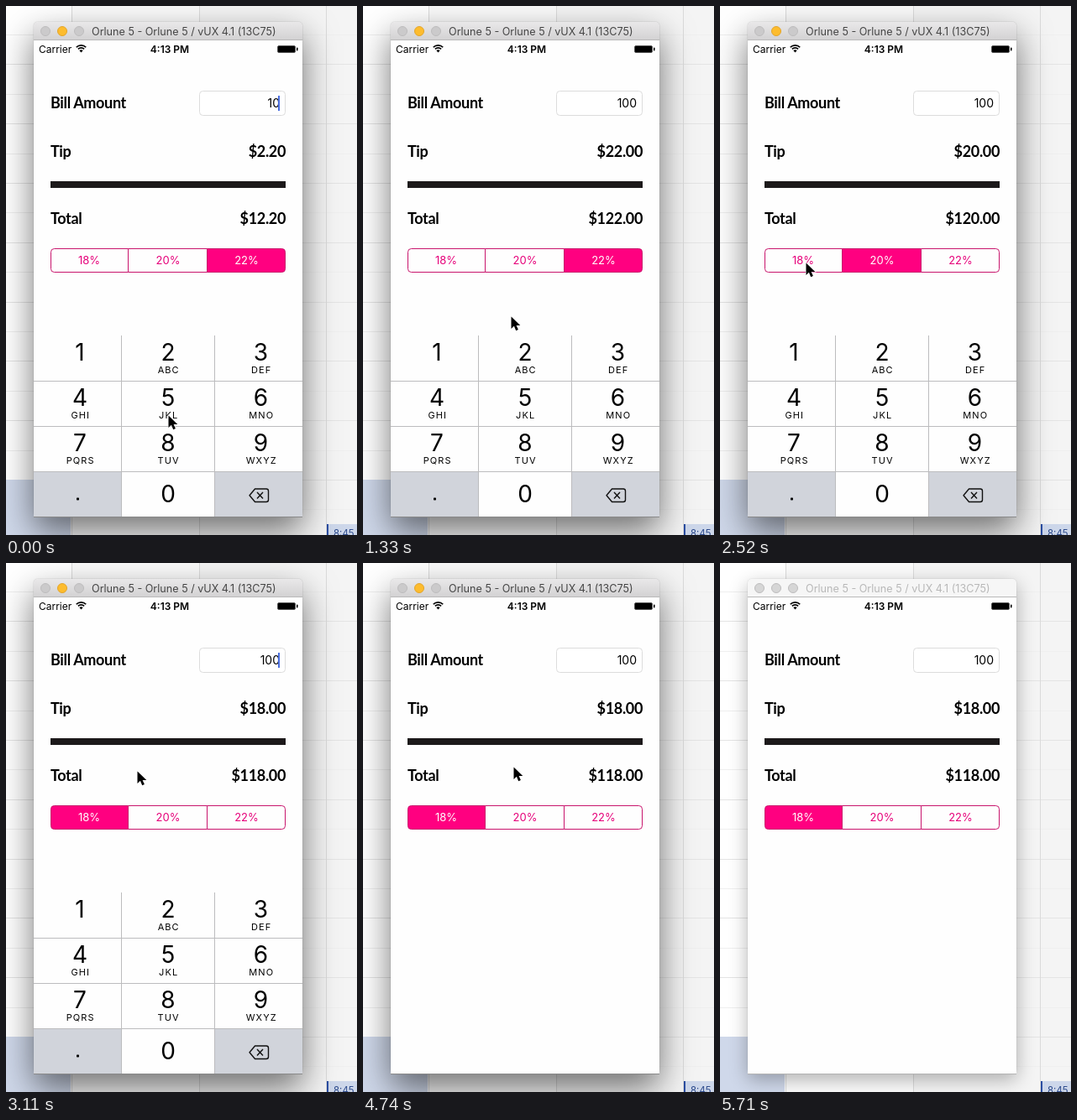
Write an HTML page that moves like this. It is 418x631 px and loops after 5810 ms.

```html
<!DOCTYPE html>
<html lang="en">
<head>
<meta charset="utf-8">
<title>Tip calculator</title>
<style>
  html, body { margin: 0; width: 100%; height: 100%; overflow: hidden; background: #fff; }
  #stage { position: absolute; left: 0; top: 0; width: 418px; height: 631px; overflow: hidden; }
  svg { position: absolute; left: 0; top: 0; font-family: Inter, sans-serif; }
  #shadow {
    position: absolute; left: 33px; top: 19px; width: 320px; height: 590px; border-radius: 5px;
    box-shadow: 0 17px 40px rgba(0, 0, 0, .55), 0 0 1px rgba(0, 0, 0, .5);
  }
  #shadow.idle { box-shadow: 0 7px 22px rgba(0, 0, 0, .3), 0 0 1px rgba(0, 0, 0, .4); }
  .label { font: 700 18px Lato, sans-serif; letter-spacing: -.35px; }
  .end { text-anchor: end; }
  .mid { text-anchor: middle; }
</style>
</head>
<body>
<div id="stage">
  <svg id="back" width="418" height="631"></svg>
  <div id="shadow"></div>
  <svg id="front" width="418" height="631">
    <defs>
      <linearGradient id="bar" x2="0" y2="1">
        <stop stop-color="#e9e8e9"/><stop offset="1" stop-color="#d2d1d2"/>
      </linearGradient>
      <clipPath id="screen"><path d="M33 41h320v568H33z"/></clipPath>
    </defs>
  </svg>
</div>
<script>
const LOOP = 5810;
const PINK = '#ff0080';
const $ = id => document.getElementById(id);

function add(parent, tag, attrs, text) {
  const node = document.createElementNS('http://www.w3.org/2000/svg', tag);
  for (const k in attrs) node.setAttribute(k, attrs[k]);
  if (text !== undefined) node.textContent = text;
  parent.appendChild(node);
  return node;
}
const rect = (p, x, y, width, height, fill, more) =>
  add(p, 'rect', { x, y, width, height, fill, ...more });
const label = (p, x, y, text, size, more) =>
  add(p, 'text', { x, y, 'font-size': size, ...more }, text);

// Calendar behind the window
const back = $('back');
rect(back, 0, 0, 418, 631, '#fff');
rect(back, 79, 0, 151, 631, '#fafafa');
rect(back, 230, 0, 188, 631, '#f4f4f4');
for (let i = 0; i < 18; i++) {
  rect(back, 0, Math.round(34 + i * 35.4), 418, 1, i % 2 ? '#e4e4e4' : '#efefef');
}
for (const x of [78, 230, 381]) rect(back, x, 0, 1, 631, '#dadada');
rect(back, 0, 565, 77, 66, '#cfd8ea');
rect(back, 382, 618, 36, 13, '#cdd7ea');
rect(back, 382, 618, 2, 13, '#2b4ea2');
label(back, 390, 633, '8:45', 11.5, { fill: '#2c4a8c' });

// Window frame
const front = $('front');
const bar = add(front, 'path', { d: 'M33 41V24q0-5 5-5h310q5 0 5 5v17z' });
rect(front, 33, 40, 320, 1, '#b9b9b9');
const lights = [47, 67, 87].map(cx =>
  add(front, 'circle', { cx, cy: 30, r: 5.5, 'stroke-width': 1 }));
const title = label(front, 102, 35, 'Orlune 5 - Orlune 5 / vUX 4.1 (13C75)', 12.6);
rect(front, 33, 41, 320, 568, '#fefefe');

// Status bar
label(front, 39, 55.5, 'Carrier', 12);
label(front, 195, 55.5, '4:13 PM', 12, { class: 'mid', 'font-weight': 600 });
for (const r of [8, 5]) {
  const d = r * .72;
  add(front, 'path', {
    d: `M${89.5 - d} ${55 - d}A${r} ${r} 0 0 1 ${89.5 + d} ${55 - d}`,
    fill: 'none', stroke: '#000', 'stroke-width': 1.7
  });
}
add(front, 'path', { d: 'M89.5 55.5l-2.2-2.4q2.2-1.8 4.4 0z' });
rect(front, 323.5, 47.5, 21, 8, '#000', { rx: 1.5, stroke: '#555', 'stroke-width': 1 });
rect(front, 346, 49.5, 1.5, 4, '#000', { rx: .7 });

// Calculator
const row = (y, text) => label(front, 53, y, text, 18, { class: 'label' });
const sum = y => label(front, 333, y, '', 18, { class: 'label end' });
row(122, 'Bill Amount');
row(180, 'Tip');
row(260, 'Total');
const tip = sum(180), total = sum(260);
rect(front, 230.5, 101.5, 102, 29, '#fff', { rx: 4, stroke: '#dcdcdc' });
const bill = label(front, 326, 121, '', 14, { class: 'end' });
const caret = rect(front, 324, 107, 2, 18, '#4a6ee0');
rect(front, 53, 209, 280, 8, '#1c191a');

const segments = [
  [18, 99, 'M145.5 289.5H57.5a4 4 0 0 0-4 4v20a4 4 0 0 0 4 4H145.5z'],
  [20, 193, 'M145.5 289.5h94v28h-94z'],
  [22, 286.5, 'M239.5 289.5h89a4 4 0 0 1 4 4v20a4 4 0 0 1-4 4h-89z']
].map(([rate, x, d]) => ({
  rate,
  box: add(front, 'path', { d, stroke: '#c8146c' }),
  text: label(front, x, 308, rate + '%', 13, { class: 'mid' })
}));

// Keypad
const clip = add(front, 'g', { 'clip-path': 'url(#screen)' });
const pad = add(clip, 'g', {});
rect(pad, 33, 393, 320, 216, '#fefefe');
rect(pad, 33, 555, 104, 54, '#d1d4db');
rect(pad, 249, 555, 104, 54, '#d1d4db');
const zero = rect(pad, 138, 555, 110, 54, '#d1d4db');
const centers = [88, 193, 303.5];
const letters = ['', 'ABC', 'DEF', 'GHI', 'JKL', 'MNO', 'PQRS', 'TUV', 'WXYZ'];
letters.forEach((text, i) => {
  const x = centers[i % 3], y = 423 + 54 * Math.floor(i / 3);
  label(pad, x, y, i + 1, 28, { class: 'mid' });
  label(pad, x + .7, y + 15, text, 11, { class: 'mid', 'letter-spacing': 1.1 });
});
label(pad, 193, 592, '0', 28, { class: 'mid' });
rect(pad, 84, 586.5, 3, 3, '#000', { rx: .8 });
add(pad, 'path', {
  d: 'M296.5 576h13.5q2.500 0 2.500 2.500v10.500q0 2.500-2.500 2.500h-13.500l-6.500-7.750zM299 580l7 7.500m0-7.500l-7 7.500',
  fill: 'none', stroke: '#111', 'stroke-width': 1.4, 'stroke-linejoin': 'round'
});
for (const y of [447, 501, 555]) rect(pad, 33, y, 320, 1, '#bcbcbe');
for (const x of [137, 248]) rect(pad, x, 393, 1, 216, '#bcbcbe');

const frame = add(front, 'path', { d: 'M33 609.5h320', stroke: '#8a8a8a' });
const arrow = add(front, 'path', {
  d: 'M.5 .5v14.500l3.400-3.200 2.300 5.400 2.700-1.100-2.300-5.200h4.700z',
  stroke: '#fff', 'stroke-width': 1.2, 'paint-order': 'stroke'
});

// Each track holds [start, value...] steps
const pointer = [
  [0, 193, 488], [140, 193, 515], [290, 191, 575], [440, 190, 603],
  [890, 189, 580], [1030, 185, 490], [1180, 179, 405], [1330, 176, 370],
  [1480, 179, 345], [1630, 182, 318], [1780, 182, 314], [2220, 150, 312],
  [2370, 115, 308], [2520, 102, 306], [2820, 108, 298], [2960, 138, 265],
  [3110, 156, 248], [3260, 166, 244], [3400, 170, 243], [4740, 179, 243],
  [4890, 179, 244], [5180, 240, 330], [5330, 345, 525], [5480, 408, 618], [5710, 500, 700]
];
const amount = [[0, 10], [740, 100]];
const rate = [[0, 22], [1780, 20], [2670, 18]];
const blink = [[0, 1], [440, 0], [740, 1], [1180, 0], [1780, 1], [2220, 0], [2670, 1], [3260, 0]];
const press = [[0, 0], [590, 1], [740, 0]];
const drop = [[0, 0], [3400, 8], [3550, 71], [3700, 158], [3850, 205], [4000, 216]];
const focus = [[0, 1], [5710, 0]];

const at = (track, t) => track.findLast(step => step[0] <= t).slice(1);
const money = n => '$' + n.toFixed(2);
const show = (node, on) => node.setAttribute('visibility', on ? 'visible' : 'hidden');

function draw(t) {
  const [sumIn] = at(amount, t), [pct] = at(rate, t), [active] = at(focus, t);
  bill.textContent = sumIn;
  tip.textContent = money(sumIn * pct / 100);
  total.textContent = money(sumIn * (1 + pct / 100));
  for (const s of segments) {
    const on = s.rate === pct;
    s.box.setAttribute('fill', on ? PINK : '#fefefe');
    s.text.setAttribute('fill', on ? '#fff' : '#e6007a');
  }
  show(caret, at(blink, t)[0]);
  show(zero, at(press, t)[0]);
  pad.setAttribute('transform', `translate(0 ${at(drop, t)[0]})`);
  arrow.setAttribute('transform', `translate(${at(pointer, t)})`);

  $('shadow').className = active ? '' : 'idle';
  bar.setAttribute('fill', active ? 'url(#bar)' : '#f6f6f6');
  title.setAttribute('fill', active ? '#454545' : '#b8b8b8');
  frame.setAttribute('stroke', active ? '#8a8a8a' : '#b4b4b4');
  lights.forEach((c, i) => {
    const lit = active && i === 1;
    c.setAttribute('fill', lit ? '#fdbc2e' : active ? '#cbcacb' : '#d6d6d6');
    c.setAttribute('stroke', lit ? '#e3a52a' : '#bdbcbd');
  });
}

const begin = performance.now();
function tick() {
  draw((performance.now() - begin) % LOOP);
  requestAnimationFrame(tick);
}
tick();
</script>
</body>
</html>
```
